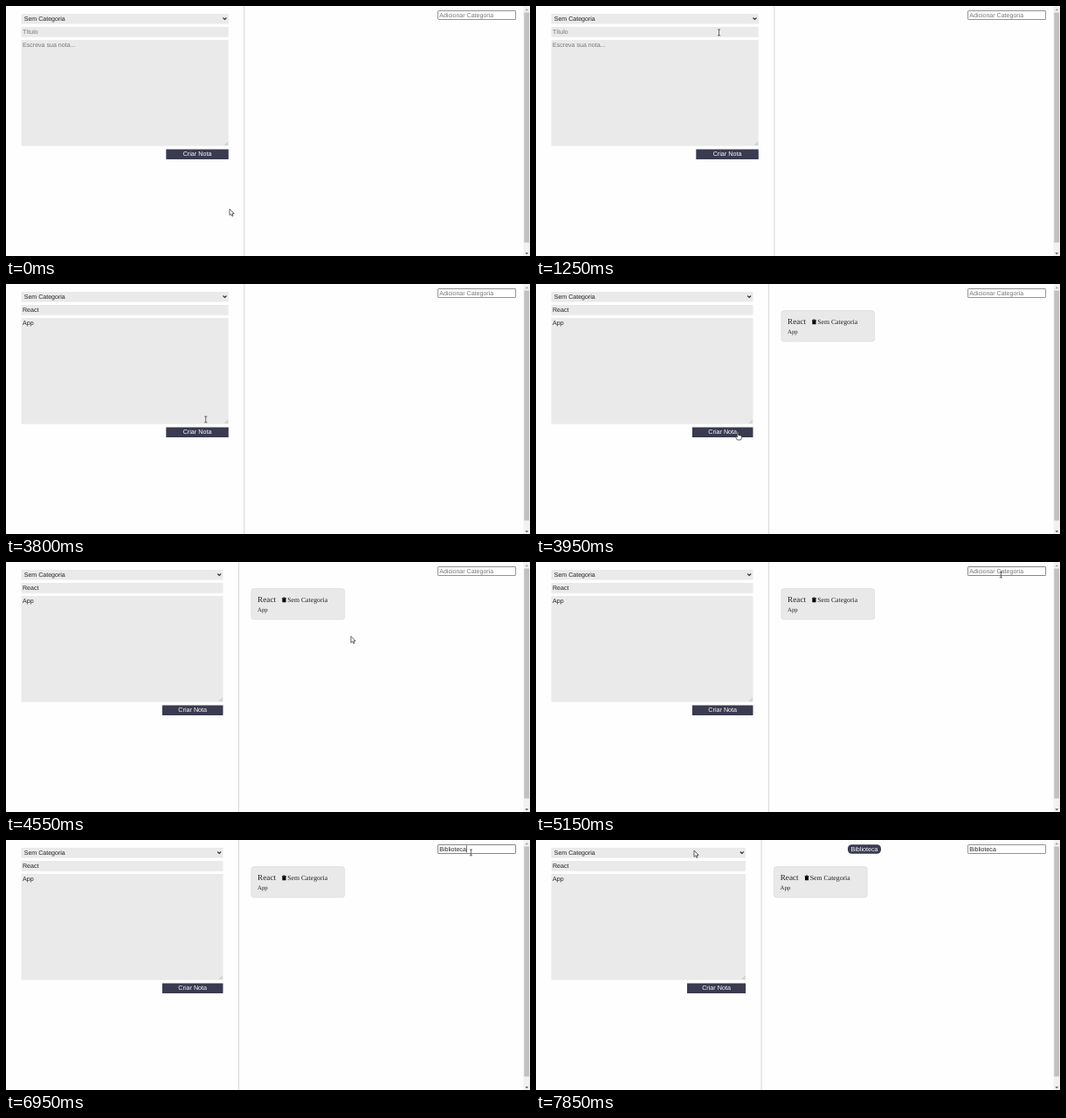
Write an HTML page that moves like this. It is 600 by 287 pixels and loops after 8 s.

```html
<!DOCTYPE html>
<html lang="pt">
<head>
<meta charset="utf-8">
<title>Notas</title>
<style>
  html, body { margin: 0; width: 100%; height: 100%; overflow: hidden; background: #fefefe; }
  svg { display: block; width: 100vw; height: 100vh; }
  text { font: 7.07px "Liberation Sans", Arial, sans-serif; fill: #222; text-rendering: geometricPrecision; white-space: pre; }
  .serif { font-family: "Liberation Serif", "Times New Roman", serif; }
  .mid { text-anchor: middle; fill: #fff; font-size: 7.2px; }
  .field { fill: #eaeaea; }
  .dark { fill: #3a3a50; }
  .line { fill: none; stroke: #333; }
  .cursor { fill: #fff; stroke: #222; stroke-width: .7; }
</style>
</head>
<body>
<svg viewBox="0 0 600 287">
  <rect width="600" height="287" fill="#fefefe"/>
  <rect id="divider" width="1.2" height="287" fill="#dcdcdc"/>

  <rect id="select" class="field" x="17.5" y="9" height="11.5"/>
  <text x="20.7" y="17">Sem Categoria</text>
  <path id="chevron" class="line" d="M-6.3 13.5l2 2 2-2" stroke-width="1.1"/>
  <rect id="title" class="field" x="17.5" y="24" height="11.7"/>
  <rect id="area" class="field" x="17.5" y="39" height="121.7"/>
  <path id="grip" class="line" d="M-4.2 160l3.6-3.6M-2 160l1.4-1.4" stroke-width=".4" opacity=".7"/>
  <g id="button">
    <rect class="dark" y="164.5" height="11.5"/>
    <text class="mid" y="172.4">Criar Nota</text>
  </g>

  <g id="card">
    <rect x=".3" y="30.6" width="106.8" height="35.4" rx="3" fill="#e9e9e9" stroke="#dcdcdc" stroke-width=".7"/>
    <text class="serif" x="7.5" y="46.3" style="font-size:9.2px">React</text>
    <path d="M35.4 41h4.9v.8h-4.9zM36.9 40.4h1.9v.6h-1.9zM35.8 42h4.1v4.3h-4.1z"/>
    <text class="serif" x="41.6" y="46" style="font-size:7.78px">Sem Categoria</text>
    <text class="serif" x="7.4" y="57.2" style="font-size:6.8px">App</text>
  </g>

  <g id="pill">
    <rect class="dark" x="357" y="5.2" width="38" height="10.6" rx="4.5"/>
    <text class="mid" x="376" y="13">Biblioteca</text>
  </g>
  <rect id="input" x="494.6" y="5.5" width="89" height="10" rx=".6" fill="#fff" stroke-width=".8"/>

  <text id="titleText" x="19" y="32"></text>
  <text id="areaText" x="19" y="47"></text>
  <text id="inputText" x="496.2" y="13"></text>
  <rect id="caret" width=".7" height="8" fill="#222"/>

  <rect x="592.5" width="7.5" height="287" fill="#f1f1f1"/>
  <rect x="593.3" y="7.5" width="5.8" height="264" fill="#c1c1c1"/>
  <path d="M594.4 5.2l1.9-2.1 1.9 2.1z" fill="#a3a3a3"/>
  <path d="M594.4 283.2l1.9 2.1 1.9-2.1z" fill="#505050"/>

  <path id="arrow" class="cursor" d="M0 0V7.3L1.7 5.8 2.9 8.3 4.1 7.7 3 5.3H5.2Z"/>
  <path id="beam" class="line" d="M-1.6-3.4H1.6M0-3.4V3.4M-1.6 3.4H1.6" stroke-width=".7"/>
  <path id="hand" class="cursor" d="M-.7.6Q0-.6.7.6V3.4L4.4 4.2V6.6L3.6 9H-.5L-2.6 5.7Q-2.5 4.6-1.5 5.1L-.7 6Z"/>
</svg>
<script>
const LOOP = 8000, STEP = 50, BLINK = 300, LEFT = 17.5;
const ADD_NOTE = 3950, ADD_CATEGORY = 7150;
const $ = id => document.getElementById(id);
const set = (el, attrs) => { for (const k in attrs) el.setAttribute(k, attrs[k]); };
const show = (el, on) => el.style.display = on ? '' : 'none';

// Each word is typed at an even pace between first and last
const fields = [
  { el: $('titleText'), hint: 'Título', word: 'React', focus: 950, first: 1400, last: 2150, blur: 2500 },
  { el: $('areaText'), hint: 'Escreva sua nota...', word: 'App', focus: 2550, first: 3000, last: 3250, blur: 3450 },
  { el: $('inputText'), hint: 'Adicionar Categoria', word: 'Biblioteca', focus: 4850, first: 5600, last: 6950, blur: 7550 }
];

// Pointer stops: the pointer glides to each one between from and to
const stops = [
  { from: 0, to: 1, x: 256, y: 233 },
  { from: 250, to: 400, x: 323, y: 259 },
  { from: 400, to: 650, x: 211, y: 27 },
  { from: 750, to: 950, x: 209.5, y: 30.4 },
  { from: 3400, to: 3900, x: 231, y: 170 },
  { from: 4100, to: 4950, x: 532.4, y: 14.4 },
  { from: 7500, to: 7850, x: 181, y: 12 }
];

function pointerAt(t) {
  let { x, y } = stops[0];
  for (const s of stops) {
    const p = Math.min(1, Math.max(0, (t - s.from) / (s.to - s.from)));
    const ease = p * p * (3 - 2 * p);
    x += (s.x - x) * ease;
    y += (s.y - y) * ease;
  }
  return [x, y];
}

function cursorKind(x, y, right) {
  const over = (x0, y0, x1, y1) => x >= x0 && x <= x1 && y >= y0 && y <= y1;
  if (over(LEFT, 24, right, 36) || over(LEFT, 39, right, 161) || over(494, 5, 584, 16)) return 'beam';
  return over(right - (right - LEFT) * .3, 165, right, 176) ? 'hand' : 'arrow';
}

function layout(t) {
  const edge = t < ADD_NOTE ? 272.3 : t < ADD_CATEGORY ? 266 : 257.6;
  const right = edge - LEFT, width = right - LEFT, buttonWidth = width * .3 + .3;
  set($('divider'), { x: edge - .1 });
  for (const id of ['select', 'title', 'area']) set($(id), { width });
  for (const id of ['chevron', 'grip']) set($(id), { transform: `translate(${right} 0)` });
  const [box, label] = $('button').children;
  set(box, { x: right - buttonWidth, width: buttonWidth });
  set(label, { x: right - buttonWidth / 2 });
  set($('card'), { transform: `translate(${edge + 14.6} 0)` });
  show($('card'), t >= ADD_NOTE);
  show($('pill'), t >= ADD_CATEGORY);
  return right;
}

function typeFields(t) {
  show($('caret'), false);
  for (const { el, hint, word, focus, first, last, blur } of fields) {
    const gap = (last - first) / (word.length - 1);
    const count = Math.min(word.length, Math.max(0, 1 + Math.floor((t - first) / gap)));
    el.textContent = word.slice(0, count) || hint;
    el.style.fill = count ? '#222' : '#757575';

    // The blink restarts with every key
    const since = t - (count ? first + (count - 1) * gap : focus);
    if (t < focus || t >= blur || Math.floor(since / BLINK) % 2) continue;
    const advance = count ? el.getComputedTextLength() : 0;
    set($('caret'), { x: +el.getAttribute('x') + advance + .1, y: el.getAttribute('y') - 6.6 });
    show($('caret'), true);
  }
  const { focus, blur } = fields[2];
  set($('input'), { stroke: t >= focus && t < blur ? '#666' : '#767676' });
}

function render(now) {
  const t = Math.floor(now % LOOP / STEP) * STEP;
  const right = layout(t);
  typeFields(t);
  const [x, y] = pointerAt(t), kind = cursorKind(x, y, right);
  for (const id of ['arrow', 'beam', 'hand']) {
    show($(id), id === kind);
    set($(id), { transform: `translate(${x} ${y})` });
  }
}

const start = performance.now();
function tick() {
  render(performance.now() - start);
  requestAnimationFrame(tick);
}
tick();
</script>
</body>
</html>
```
